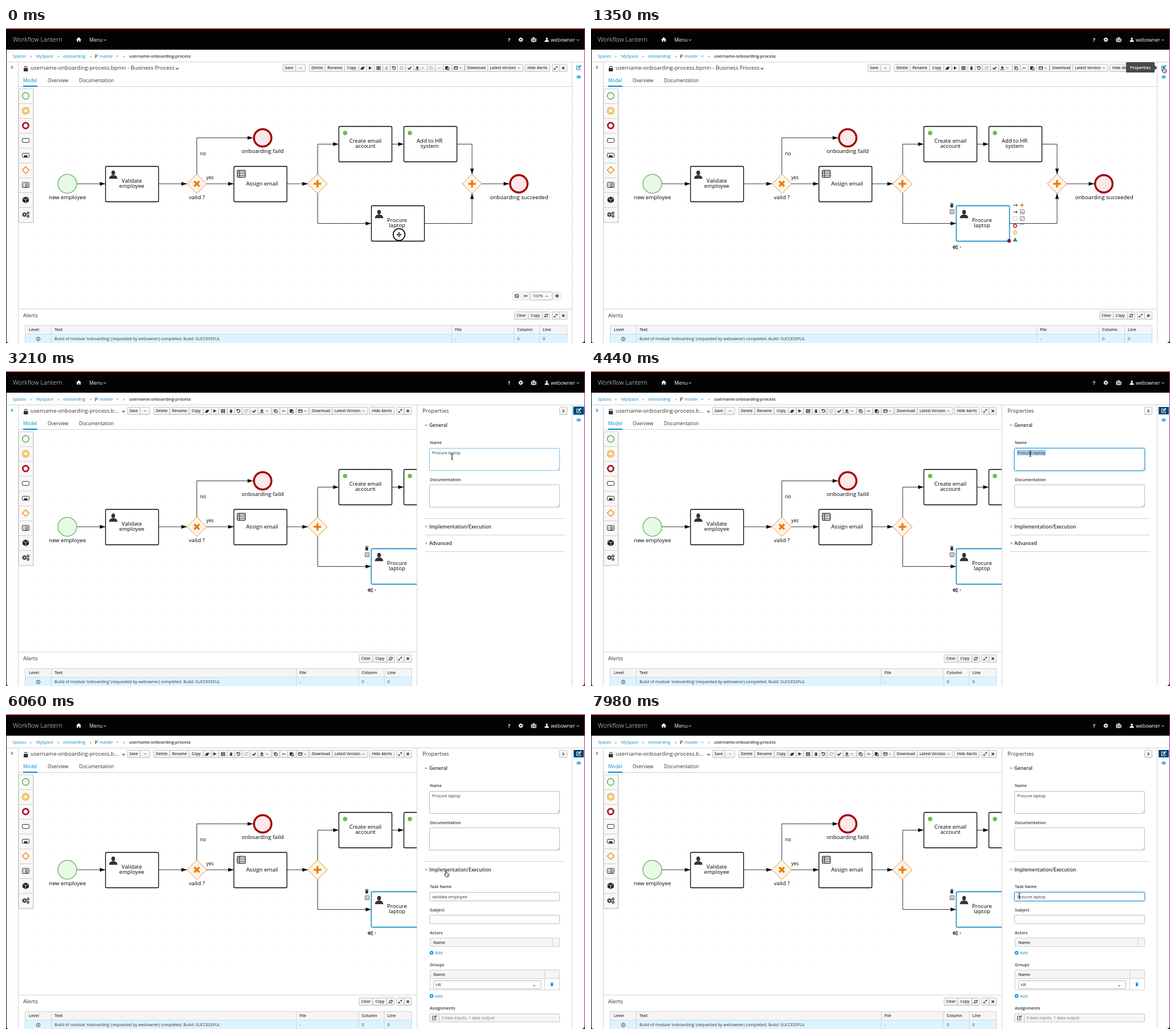
An HTML page with a canvas that plays this animation: 1015 by 552 pixels, repeating every 8000 ms.

```html
<!DOCTYPE html>
<html lang="en">
<head>
<meta charset="utf-8">
<title>Process editor</title>
<style>
html, body { margin: 0; width: 100%; height: 100%; overflow: hidden; background: #fff; }
canvas { display: block; width: 1015px; height: 552px; }
</style>
</head>
<body>
<canvas id="stage"></canvas>
<script>
const W = 1015, H = 552, LOOP = 8000;
const BLUE = '#0088ce', INK = '#333', ORANGE = '#ec7a08', RED = '#a30000', LINE = '#d1d1d1';
const SMALL = 7.22, TAB = 8.43, BIG = 9.63, BUTTON = 6.62;
const canvas = document.getElementById('stage');
const c = canvas.getContext('2d');
const ratio = window.devicePixelRatio || 1;
canvas.width = W * ratio;
canvas.height = H * ratio;

// ---- primitives -------------------------------------------------------
function text(s, x, y, size = SMALL, color = INK, weight = 400, align = 'left', family = '"Open Sans", sans-serif') {
  c.font = `${weight} ${size}px ${family}`;
  c.fillStyle = color;
  c.textAlign = align;
  c.fillText(s, x, y + size * 0.36);
}
const label = (s, x, y, size = BIG) => text(s, x, y, size, '#000', 400, 'center');
const glyph = (s, x, y, size = 8, color = INK) => text(s, x, y, size, color, 400, 'center', '"DejaVu Sans", sans-serif');

function paint(fill, stroke, width = 1) {
  if (fill) { c.fillStyle = fill; c.fill(); }
  if (stroke) { c.strokeStyle = stroke; c.lineWidth = width; c.stroke(); }
}
function shape(points, fill, stroke, width, closed = true) {
  c.beginPath();
  points.forEach(([x, y]) => c.lineTo(x, y));
  if (closed) c.closePath();
  paint(fill, stroke, width);
}
const line = (points, color = INK, width = 1) => shape(points, null, color, width, false);
function box(x, y, w, h, fill, stroke, radius = 0, width = 1) {
  const o = stroke ? 0.5 : 0;
  c.beginPath();
  c.roundRect(x + o, y + o, w - 2 * o, h - 2 * o, radius);
  paint(fill, stroke, width);
}
function glow(x, y, w, h, color, blur) {
  c.save();
  c.shadowColor = color;
  c.shadowBlur = blur * ratio;
  box(x, y, w, h, '#fff', null, 1);
  c.restore();
}
function circle(x, y, r, fill, stroke, width) {
  c.beginPath();
  c.arc(x, y, r, 0, 7);
  paint(fill, stroke, width);
}
const hline = (x1, x2, y, color = LINE) => box(x1, y, x2 - x1, 1, color);
const vline = (x, y1, y2, color = LINE) => box(x, y1, 1, y2 - y1, color);
function clipped(x, y, w, h, draw) {
  c.save();
  c.beginPath();
  c.rect(x, y, w, h);
  c.clip();
  draw();
  c.restore();
}

// ---- icons ------------------------------------------------------------
function chevron(x, y, dir = 'down', color = INK, s = 2, width = 1) {
  const points = { down: [[-s, -s / 2], [0, s / 2], [s, -s / 2]], up: [[-s, s / 2], [0, -s / 2], [s, s / 2]], right: [[-s / 2, -s], [s / 2, 0], [-s / 2, s]] };
  line(points[dir].map(([a, b]) => [x + a, y + b]), color, width);
}
function plus(x, y, s, color, width) {
  line([[x - s, y], [x + s, y]], color, width);
  line([[x, y - s], [x, y + s]], color, width);
}
function cross(x, y, s, color, width) {
  line([[x - s, y - s], [x + s, y + s]], color, width);
  line([[x - s, y + s], [x + s, y - s]], color, width);
}
function user(x, y, s, color) {
  c.beginPath();
  c.ellipse(x, y - s * 0.45, s * 0.45, s * 0.55, 0, 0, 7);
  paint(color);
  c.beginPath();
  c.moveTo(x - s, y + s);
  c.quadraticCurveTo(x - s, y + s * 0.3, x - s * 0.25, y + s * 0.15);
  c.lineTo(x + s * 0.25, y + s * 0.15);
  c.quadraticCurveTo(x + s, y + s * 0.3, x + s, y + s);
  paint(color);
}
function trash(x, y, color, s = 1) {
  box(x - 3 * s, y - 3 * s, 6 * s, s, color);
  box(x - s, y - 4 * s, 2 * s, s, color);
  box(x - 2.4 * s, y - 1.5 * s, 4.8 * s, 5.5 * s, color, null, 0.7);
}
function edit(x, y, color) {
  line([[x + 1, y - 3], [x - 3.5, y - 3], [x - 3.5, y + 3.5], [x + 3, y + 3.5], [x + 3, y + 1]], color);
  line([[x - 1, y + 1], [x + 4, y - 4]], color, 1.8);
}
function expand(x, y) {
  line([[x - 2.5, y + 2.5], [x + 2.5, y - 2.5]], INK, 0.9);
  shape([[x + 3, y - 3], [x, y - 3], [x + 3, y]], INK);
  shape([[x - 3, y + 3], [x, y + 3], [x - 3, y]], INK);
}
function pages(x, y, color) {
  box(x - 3, y - 3, 4.5, 5, '#fff', color);
  box(x - 1, y - 1.5, 4.5, 5, '#fff', color);
}
function gear(x, y, r, color = INK) {
  circle(x, y, r * 0.55, null, color, r * 0.42);
  for (let i = 0; i < 8; i++) {
    const dx = Math.cos(i * Math.PI / 4), dy = Math.sin(i * Math.PI / 4);
    line([[x + dx * r * 0.6, y + dy * r * 0.6], [x + dx * r, y + dy * r]], color, r * 0.38);
  }
}
function gears(x, y, r) {
  gear(x - r * 0.4, y, r * 0.75);
  gear(x + r * 0.75, y - r * 0.5, r * 0.48);
  gear(x + r * 0.75, y + r * 0.55, r * 0.48);
}
// Circular arrow; side -1 turns left, 1 turns right.
function turn(x, y, side, color = INK) {
  c.beginPath();
  c.ellipse(x, y, 2.5, 2.5, 0, side < 0 ? -2.5 : -0.6, side < 0 ? 2.5 : 0.6, side > 0);
  paint(null, color, 1.2);
  shape([[x + side * 3.4, y - 3.6], [x + side * 3.4, y - 0.3], [x + side * 0.3, y - 0.3]], color);
}
function refresh(x, y) {
  [-1, 1].forEach(d => {
    c.beginPath();
    c.arc(x, y, 2.4, d < 0 ? 3.3 : 0.2, d < 0 ? 5.8 : 2.7);
    paint(null, INK, 1.1);
    shape([[x - d * 3.3, y + d * 3.3], [x - d * 3.3, y + d * 0.6], [x - d * 0.6, y + d * 0.6]], INK);
  });
}
function grip(x, y) {
  line([[x - 4, y], [x, y - 4]], '#888', 0.6);
  line([[x - 2, y], [x, y - 2]], '#888', 0.6);
}

// ---- page frame ---------------------------------------------------------
function header() {
  box(0, 0, W, H, '#fff');
  box(0, 0, W, 38, '#030303');
  hline(0, W, 0, '#f0b4b8');
  hline(0, W, 1, '#c4121f');
  text('Workflow Lantern', 12, 20.5, 11, '#f2f2f2', 300);
  shape([[123, 20.5], [127.5, 16], [132, 20.5], [130.7, 20.5], [130.7, 24], [128.4, 24], [128.4, 21.3], [126.6, 21.3], [126.6, 24], [124.3, 24], [124.3, 20.5]], '#fff');
  text('Menu', 146, 20.5, 8.7, '#fff');
  chevron(173.5, 21, 'down', '#fff');
  text('?', 882, 20.5, 9, '#fff', 700, 'center');
  gear(902.5, 20.5, 4, '#fff');
  box(920.5, 18, 9, 6.5, '#fff', null, 1);
  box(923, 16, 4, 3, null, '#fff');
  [922, 927.2].forEach(x => box(x, 18, 0.8, 6.5, '#030303'));
  plus(925, 21.3, 1.6, '#030303', 0.9);
  user(948, 20.5, 3.8, '#fff');
  text('webowner', 955, 20.5, 8.7, '#fff');
  chevron(1002.5, 21, 'down', '#fff');

  [['Spaces', 12], ['MySpace', 53], ['onboarding', 100], ['master', 164]].forEach(([s, x]) => text(s, x, 49, SMALL, BLUE));
  [43.5, 91.5, 148.5, 206.5].forEach(x => text('»', x, 49, SMALL, '#777', 400, 'center'));
  line([[157, 46], [157, 53]], INK);
  line([[157, 50.5], [160, 49], [160, 46]], INK);
  chevron(195, 49.5, 'down', BLUE, 1.8);
  text('username-onboarding-process', 216, 49, 7.3, INK, 600);
  hline(0, W, 59);
  vline(21, 59, H);
  chevron(10.5, 69, 'right', BLUE, 2.4, 1.4);
}

function button(x1, x2, y, s) {
  const shade = c.createLinearGradient(0, y, 0, y + 14);
  shade.addColorStop(0, '#fbfbfb');
  shade.addColorStop(1, '#ededed');
  box(x1, y, x2 - x1, 14, shade, '#bfbfbf', 1);
  if (s) text(s, (x1 + x2) / 2, y + 7, BUTTON, INK, 600, 'center');
}

function toolbar(dx, selected) {
  text(dx ? 'username-onboarding-process.b...' : 'username-onboarding-process.bpmn - Business Process', 43, 70, BIG);
  chevron(dx ? 206 : 300, 71, 'down', INK, 2.4, 1.2);
  box(31, 70, 7.5, 6, INK, null, 1);
  c.beginPath();
  c.arc(34.7, 69.3, 2.3, Math.PI, 0);
  paint(null, INK, 1.2);

  c.save();
  c.translate(dx, 0);
  const dim = selected ? INK : '#b5b5b5', y = 70;
  [[485, 508, 'Save'], [507, 525], [531, 560, 'Delete'], [559, 594, 'Rename'], [593, 619, 'Copy'], [618, 633], [632, 646], [645, 661],
   [660, 674], [673, 687], [686, 701], [700, 715], [714, 739], [738, 753], [752, 767], [766, 782], [781, 804], [804, 845, 'Download'],
   [844, 907], [909, 954, 'Hide Alerts'], [957, 971], [970, 984]].forEach(([a, b, s]) => button(a, b, 63, s));
  text('Latest Version', 848.5, y, BUTTON, INK, 600);
  [516, 730, 797, 899].forEach(x => chevron(x, y, 'down', INK, 1.6, 0.9));
  shape([[621, 73], [624, 68], [629, 68], [626, 73]], INK);
  shape([[636, 67], [641.5, 70], [636, 73]], INK);
  for (let i = 0; i < 9; i++) box(649.5 + i % 3 * 2.5, 67 + Math.floor(i / 3) * 2.3, 2, 1.8, INK);
  trash(667, y, dim, 0.8);
  turn(680, y, -1);
  turn(693.5, y, 1, '#b5b5b5');
  line([[704.5, 70], [706.7, 72.2], [710.5, 68]], INK, 1.7);
  shape([[720, 67], [722, 67], [722, 69], [724, 69], [721, 72], [718, 69], [720, 69]], INK);
  hline(717.5, 724.5, 72.5, INK);
  pages(745, y, dim);
  glyph('✂', 759.5, y, 8, dim);
  box(770, 67, 5, 6, INK);
  box(773, 69, 4, 5, '#fff', INK);
  box(785, 67, 7, 6, null, INK);
  hline(785, 792, 69, INK);
  expand(963.5, y);
  cross(977, y, 2, INK, 1.5);
  c.restore();

  [['Model', 30, BLUE], ['Overview', 73, INK], ['Documentation', 128, INK]].forEach(([s, x, color]) => text(s, x, 91.5, TAB, color));
  hline(22, 993, 102);
  box(30, 101, 25, 2, BLUE);
}

function palette() {
  box(23, 107, 26, 235, 'rgba(0,0,0,.13)', null, 1);
  for (let i = 0; i < 9; i++) box(22, 106 + i * 26, 26, 27, '#f8f8f8', '#cfcfcf');
  const x = 34.5;
  circle(x, 119, 5.8, '#f3fbf2', '#3f9c35', 1.2);
  circle(x, 145, 6, '#fff6e5', '#e3a008', 1.1);
  circle(x, 145, 3.6, null, '#e3a008', 1.1);
  circle(x, 171, 5, '#fff', '#b3152b', 3);
  box(28, 193, 13, 8, '#fff', INK, 1);
  box(28, 219, 13, 8, '#fff', INK, 1);
  box(31.5, 223, 6, 3, INK);
  shape([[x, 243], [x + 6, 249], [x, 255], [x - 6, 249]], '#fff7ee', ORANGE, 1.2);
  box(28, 270, 13, 10, '#fff', INK, 1);
  [273, 275.5, 278].forEach(y => { box(30, y - 0.6, 1.6, 1.2, INK); box(33, y - 0.6, 6, 1.2, INK); });
  shape([[x, 295.5], [x + 5.5, 298], [x + 5.5, 304], [x, 307], [x - 5.5, 304], [x - 5.5, 298]], '#222');
  line([[x - 5, 298.4], [x, 300.8], [x + 5, 298.4]], '#f8f8f8', 0.8);
  line([[x, 300.8], [x, 306.5]], '#f8f8f8', 0.8);
  gears(x, 327, 5.5);
}

// ---- diagram --------------------------------------------------------------
function flow(...points) {
  line(points, '#222', 0.9);
  const [x, y] = points.at(-1), [px, py] = points.at(-2);
  const ux = Math.sign(x - px), uy = Math.sign(y - py);
  shape([[x, y], [x - 9.5 * ux + 3.2 * uy, y - 9.5 * uy + 3.2 * ux], [x - 9.5 * ux - 3.2 * uy, y - 9.5 * uy - 3.2 * ux]], '#000');
}
function task(x, y, lines, tx, active) {
  if (active) glow(x, y, 94, 63, 'rgba(0,0,0,.3)', 3);
  box(x, y, 94, 63, '#fff', active ? BLUE : '#000', 2, 1.3);
  const mid = y + 30.5 - (lines.length - 1) * 4.7;
  lines.forEach((s, i) => label(s, tx, mid + i * 9));
}
function gateway(x, mark) {
  const y = 273;
  shape([[x, y - 17], [x + 17, y], [x, y + 17], [x - 17, y]], '#fef5ea', '#e08a35', 1);
  mark(x, y, mark === plus ? 6.5 : 4.5, ORANGE, 3.4);
}

function diagram(selected, hovered) {
  c.fillStyle = '#d6d6d6';
  for (let x = 54; x < 993; x += 28.2) for (let y = 106; y < 490; y += 28.2) c.fillRect(x, y, 1.2, 1);

  const y = 273;
  flow([124, y], [174, y]);
  flow([267, y], [317, y]);
  flow([351, y], [399, y]);
  flow([334.5, 256], [334.5, 192.5], [433, 192.5]);
  flow([492, y], [529, y]);
  flow([546.5, 256], [546.5, 203.5], [583, 203.5]);
  flow([546.5, 290], [546.5, 342.5], [640, 342.5]);
  flow([676, 203.5], [697, 203.5]);
  flow([790, 203.5], [817, 203.5], [817, 256]);
  flow([733, 342.5], [817, 342.5], [817, 290]);
  flow([834, y], [882, y]);

  circle(107.5, y, 16.5, '#e8fae6', '#4aa241', 1.1);
  [[450, 192.5], [899, y]].forEach(([ex, ey]) => circle(ex, ey, 15.3, '#fce8e8', RED, 3.4));
  gateway(334.5, cross);
  gateway(546, plus);
  gateway(817, plus);
  task(174, 242, ['Validate', 'employee'], 220.5);
  task(399, 242, ['Assign email'], 449);
  task(583, 172, ['Create email', 'account'], 630);
  task(697, 172, ['Add to HR', 'system'], 742.5);
  task(640, 311, ['Procure', 'laptop'], 685.5, selected);
  user(188, 257, 7.3, INK);
  user(654, 326, 7.3, INK);
  circle(594.5, 184, 3.8, '#6fbf3a');
  circle(708, 184, 3.8, '#6fbf3a');
  box(405, 249, 15, 13, '#fff', INK, 1, 1.3);
  [252, 255, 258].forEach(ly => hline(405, 420, ly, INK));
  vline(409, 250, 261, INK);

  label('new employee', 107.5, 296.5);
  label('valid ?', 334.5, 296.5);
  label('onboarding faild', 450, 216);
  label('onboarding succeeded', 899.5, 296.5);
  label('no', 345.5, 220, TAB);
  label('yes', 357.5, 262, TAB);
  if (selected) selectionTools();
  if (hovered) zoomBar();
}

function zoomBar() {
  box(887, 461, 87, 17, '#f1f1f1', null, 2);
  circle(895.5, 469.5, 3, null, INK, 1.1);
  line([[893.5, 467.5], [897.5, 471.5]], INK);
  line([[908, 469.5], [914, 469.5]], INK, 1.6);
  box(918, 462, 40, 15, '#f8f8f8', '#bbb', 1);
  text('100%', 923, 469.5, 7.2);
  chevron(948, 470, 'up', INK, 1.8, 0.9);
  plus(966, 469.5, 3.2, INK, 1.6);
}

function selectionTools() {
  trash(632.5, 310.5, INK);
  box(629, 318, 8, 8, '#fff', '#666');
  [320.5, 323].forEach(y => hline(630.5, 635.5, y, '#777'));
  gears(638.5, 384, 4);
  chevron(647.5, 384, 'right', INK, 1.6);
  [310.5, 322.5].forEach(y => {
    line([[740, y], [746, y]], INK, 0.9);
    shape([[748, y], [745, y - 2], [745, y + 2]], INK);
  });
  plus(755.5, 310.5, 3, ORANGE, 1.7);
  box(752, 318, 8, 8, '#fff', '#777');
  box(754.5, 322, 3, 2, '#777');
  box(739.5, 330, 8, 8, '#fff', '#ccc');
  box(752, 330, 8, 8, '#fff', '#777');
  line([[754, 336], [758, 332]], '#777');
  circle(743.5, 346.5, 2.8, '#fff', '#b3152b', 1.4);
  line([[752, 346], [753, 344], [760, 344]], '#888');
  circle(743.5, 358.5, 3.2, '#fff8ea', '#e9a13b');
  circle(743.5, 358.5, 1.4, null, '#e9a13b', 0.7);
  shape([[743.5, 367], [747.5, 374], [739.5, 374]], '#2a85a0');
  circle(733, 373, 3, '#8f1d2c', '#6d1420', 0.7);
}

function alerts(dx) {
  box(22, 492, 971, 60, '#fff');
  hline(22, 993, 492);
  text('Alerts', 30, 503.5, BIG);
  box(33, 521, 951 + dx, 31, '#def3ff');
  box(33, 521, 951 + dx, 15, '#f5f5f5');
  hline(33, 984 + dx, 521);
  hline(33, 984 + dx, 536, '#bee1f4');
  [33, 79, 781 + dx, 890 + dx, 935 + dx, 983 + dx].forEach(x => vline(x, 521, H, '#cfd6da'));
  text('Level', 40, 528, SMALL, INK, 600);
  text('Text', 85, 528, SMALL, INK, 600);
  text("Build of module 'onboarding' (requested by webowner) completed. Build: SUCCESSFUL", 85, 544.5);
  circle(56.5, 545, 3.2, null, INK, 0.9);
  box(56, 544.5, 1, 2.2, INK);
  box(56, 543, 1, 0.9, INK);
  c.save();
  c.translate(dx, 0);
  [['File', 787, '-'], ['Column', 896, '0'], ['Line', 941, '0']].forEach(([s, x, value]) => {
    text(s, x, 528, SMALL, INK, 600);
    text(value, x, 544.5);
  });
  [[891, 916, 'Clear'], [915, 941, 'Copy'], [940, 954], [957, 971], [970, 984]].forEach(([a, b, s]) => button(a, b, 497, s));
  refresh(947, 504);
  expand(963.5, 504);
  cross(977, 504, 2, INK, 1.5);
  c.restore();
}

// ---- properties panel ---------------------------------------------------
function field(y, h, value, { hover, focus, selected } = {}) {
  if (focus) glow(742, y, 229, h, 'rgba(0,136,206,.5)', 4);
  box(742, y, 229, h, '#fff', focus ? '#2b9ad6' : hover ? '#7dc3e8' : '#bbb', 1);
  if (selected) box(747, y + 3, selected, 10, '#accdea');
  if (value) text(value, 747, y + 8);
}
const caption = (s, y) => text(s, 743, y, SMALL, INK, 600);
function section(s, y, open) {
  chevron(736.5, y, open ? 'down' : 'right', INK, 1.8);
  text(s, 742, y, TAB, INK, 600);
}
function add(y) {
  circle(746, y, 3.2, BLUE);
  plus(746, y, 1.8, '#fff', 1);
  text('Add', 752, y, SMALL, BLUE);
}
function tableHead(y, split) {
  box(743, y, 228, 16, '#f5f5f5', '#d1d1d1');
  vline(split, y, y + 16);
  text('Name', 749, y + 8, SMALL, INK, 600);
}

function panel(t, pointer) {
  box(721, 60, 272, 492, '#fff');
  vline(720, 59, H);
  text('Properties', 730, 70, BIG);
  button(970, 984, 63);
  chevron(977, 70, 'right', INK, 2.4, 1.3);
  section('General', 95, true);

  const over = (y, h) => pointer.x > 743 && pointer.x < 970 && pointer.y > y && pointer.y < y + h;
  const open = t >= 5880;
  caption('Name', 125.5);
  field(135, 40, 'Procure laptop', {
    hover: over(135, 40), focus: t >= 3900 && t < 5850,
    selected: t >= 5850 || t < 3990 ? 0 : t < 4050 ? 26.5 : 50
  });
  caption('Documentation', 190);
  field(199, 40);
  grip(970, 173);
  grip(970, 238);
  hline(734, 980, 258);
  section('Implementation/Execution', 272.5, open);
  if (!open) {
    hline(734, 980, 287);
    section('Advanced', 302, false);
    hline(734, 980, 316);
    return;
  }
  caption('Task Name', 302.5);
  const pasted = t >= 7950;
  field(312, 16, pasted ? 'Procure laptop' : 'validate-employee', {
    hover: over(312, 16), focus: t >= 7200,
    selected: pasted || t < 7590 ? 0 : t < 7680 ? 27 : 62.5
  });
  caption('Subject', 343);
  field(352, 16);
  caption('Actors', 383.5);
  tableHead(392, 958);
  add(418.5);
  caption('Groups', 439.5);
  tableHead(448, 944);
  box(743, 463, 228, 21, null, LINE);
  vline(944, 463, 484);
  box(749, 467, 189, 15, '#fff', '#bbb', 1);
  text('HR', 753, 474);
  chevron(926, 476, 'down', INK, 1.8, 0.9);
  trash(957, 473.5, BLUE, 0.8);
  add(494);
  caption('Assignments', 515);
  box(742, 525, 229, 15, '#f5f5f5', '#c4c4c4', 1);
  vline(759, 525, 540, '#c4c4c4');
  edit(751, 532.5, '#555');
  text('3 data inputs, 1 data output', 763, 532.5, SMALL, '#777');
}

function dock(t, open) {
  box(993, 60, 21, 492, '#fff');
  vline(992, 59, H);
  if (open) {
    if (t < 3900) box(994, 62, 20, 15, '#fff', '#5ba7dc', 2, 1.5);
    box(995, 63, 18, 13, '#00466f');
  }
  edit(1004, 69.5, open ? '#fff' : BLUE);
  c.beginPath();
  c.ellipse(1004, 86, 3.8, 2.2, 0, 0, 7);
  paint('#fff', BLUE, 0.9);
  circle(1004, 85.6, 1.7, BLUE);

  const alpha = t < 1900 ? (t - 1200) / 120 : (2370 - t) / 120;
  c.globalAlpha = Math.max(0, Math.min(1, alpha));
  box(938, 60, 50, 18, '#474a4d', null, 1);
  shape([[988, 65], [992.5, 69.5], [988, 74]], '#474a4d');
  text('Properties', 963, 69, SMALL, '#fff', 600, 'center');
  c.globalAlpha = 1;
}

// ---- pointer --------------------------------------------------------------
const path = [
  [0, 689, 362], [330, 689, 362], [780, 978, 92], [1110, 978, 92], [1320, 1005, 73], [1560, 1003, 78],
  [2220, 1003, 78], [2970, 784, 153], [3210, 782, 150.5], [3330, 782, 150.5], [3720, 770, 145], [4830, 770, 145],
  [5520, 773, 303], [5580, 773, 303], [5670, 773, 277], [5970, 773, 277], [6570, 765, 322], [6780, 765, 322],
  [6930, 751, 319], [LOOP, 751, 319]
];
const clicks = [[0, 100], [1890, 1950], [3870, 3930], [3960, 4020], [4050, 4110], [5820, 5880], [7170, 7230], [7500, 7560], [7590, 7650], [7680, 7740]];

function pointerAt(t) {
  const i = path.findIndex(p => p[0] > t);
  const [t0, x0, y0] = path[i - 1], [t1, x1, y1] = path[i];
  const k = (t - t0) / (t1 - t0), e = k * k * (3 - 2 * k);
  return { x: x0 + (x1 - x0) * e, y: y0 + (y1 - y0) * e };
}
function pointerKind({ x, y }, t) {
  if (x > 994) return 'hand';
  if (t < 1000) return x < 734 && y > 311 ? 'move' : 'arrow';
  if (x > 743 && x < 970) {
    if (y > 135 && y < 175 || y > 199 && y < 239 || t > 5880 && y > 312 && y < 328) return 'beam';
    if (y > 265 && y < 309 && (t < 5880 || y < 280)) return 'hand';
  }
  return 'arrow';
}
function drawPointer(t, p) {
  const kind = pointerKind(p, t);
  c.save();
  c.translate(p.x, p.y);
  if (clicks.some(([a, b]) => t >= a && t < b)) circle(0, 0, 10.3, 'rgba(255,255,255,.75)', '#111', 1.8);
  if (kind === 'move') {
    plus(0, 0, 4.5, '#fff', 3);
    plus(0, 0, 3, '#111', 1.2);
    for (const [x, y] of [[1, 0], [-1, 0], [0, 1], [0, -1]])
      shape([[x * 4.5, y * 4.5], [x * 2.5 + y * 2, y * 2.5 + x * 2], [x * 2.5 - y * 2, y * 2.5 - x * 2]], '#111');
  } else if (kind === 'beam') {
    line([[0, -4], [0, 4]], '#111');
    line([[-2, -5], [0, -4], [2, -5]], '#111', 0.9);
    line([[-2, 5], [0, 4], [2, 5]], '#111', 0.9);
    line([[-1, 1], [1, 1]], '#111', 0.8);
  } else if (kind === 'hand') {
    shape([[-2, -5], [-0.7, -5], [-0.5, -1.5], [3, -0.8], [4, 0], [3.8, 3], [2.8, 5.5], [-1.5, 5.5], [-4, 1.5], [-3.5, 0.7], [-2, 1.8]], '#fff', '#111', 0.9);
    [0.5, 2].forEach(x => line([[x, 1], [x, 3.6]], '#111', 0.6));
  } else {
    shape([[-3, -5], [-3, 4.5], [-0.8, 2.6], [0.8, 6], [2.3, 5.3], [0.8, 2], [3.8, 2]], '#111', '#fff', 0.8);
  }
  c.restore();
}

function edges() {
  vline(0, 38, H, '#111');
  vline(W - 1, 0, H, '#a52a9a');
  for (const [x, d] of [[0, 1], [W - 1, -1]]) {
    c.beginPath();
    c.moveTo(x, H - 6);
    c.quadraticCurveTo(x, H, x + 6 * d, H);
    c.lineTo(x, H);
    paint('#111');
  }
}

function draw(t) {
  c.setTransform(ratio, 0, 0, ratio, 0, 0);
  const selected = t >= 90, open = t >= 1920, dx = open ? -272.5 : 0;
  const pointer = pointerAt(t);
  header();
  clipped(22, 60, open ? 699 : 971, 492, () => {
    clipped(22, 103, 971, 389, () => diagram(selected, pointer.y > 103));
    palette();
    toolbar(dx, selected);
    alerts(dx);
  });
  if (open) panel(t, pointer);
  dock(t, open);
  edges();
  drawPointer(t, pointer);
}

const start = performance.now();
function tick() {
  draw((performance.now() - start) % LOOP);
  requestAnimationFrame(tick);
}
tick();
</script>
</body>
</html>
```
